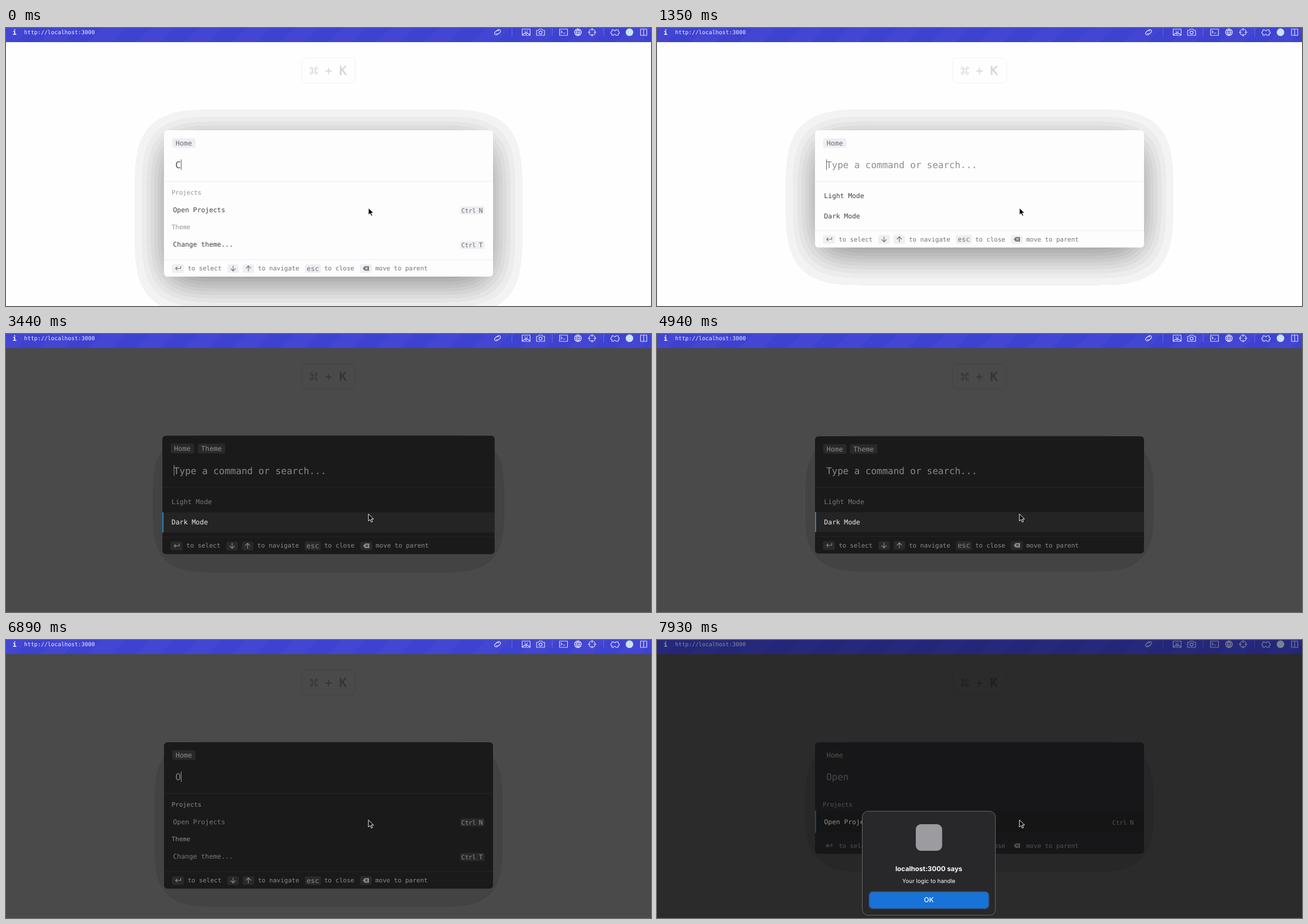
An HTML page that plays this animation: 1139 by 492 pixels, repeating every 8 s.

```html
<!DOCTYPE html>
<html lang="en">
<head>
<meta charset="utf-8">
<title>Command menu</title>
<style>
html, body { margin: 0; height: 100%; overflow: hidden; background: #fefefe; }
svg { display: block; width: 100vw; height: 100vh; }
text { font-family: "DejaVu Sans Mono", "Liberation Mono", monospace; text-rendering: geometricPrecision; white-space: pre; }
.ui { font-family: Inter, Roboto, sans-serif; text-anchor: middle; fill: #fff; }
.icon { fill: none; stroke-width: 1.2; stroke-linecap: round; stroke-linejoin: round; }
</style>
</head>
<body>
<svg id="stage" viewBox="0 0 1139 492" xmlns="http://www.w3.org/2000/svg"></svg>
<script>
const LOOP = 8000;
const stage = document.getElementById('stage');

const light = {
  page: '#fefefe', panel: '#fdfdfd', line: '#efeff0', tag: '#eeeff2', tagText: '#6b6b73',
  input: '#505054', hint: '#8e8e8e', caret: '#555', head: '#949494', row: '#404045',
  active: '#404045', foot: '#74747a', keyLine: '#f0f1f3', key: '#d2d5da', activeRow: 'none', bar: 'none',
  steps: Array.from({ length: 16 }, (_, k) => k ? k * .0312 + .012 : 0)
};
const dark = {
  page: '#4a4a4a', panel: '#1a1a1a', line: '#252525', tag: '#292929', tagText: '#8c8c8c',
  input: '#7c7c7c', hint: '#878787', caret: '#999', head: '#8c8c8c', row: '#777',
  active: '#eee', foot: '#8a8a8a', keyLine: '#434343', key: '#343434', activeRow: '#242424', bar: '#2c86b8',
  steps: Array.from({ length: 16 }, (_, k) => k < 5 ? 0 : .1)
};

const project = { group: 'Projects', label: 'Open Projects', key: 'N' };
const change = { group: 'Theme', label: 'Change theme...', key: 'T' };
const home = [project, change];
const modes = [{ label: 'Light Mode' }, { label: 'Dark Mode' }];

// Each entry changes part of the state from its time onward.
const timeline = [
  [0, { theme: light, items: home, query: 'C', caret: true, crumbs: ['Home'], active: -1, zoom: 1, alert: false }],
  [150, { query: 'Ch', items: [change] }],
  [300, { query: 'Cha' }],
  [450, { query: 'Chan' }],
  [600, { query: 'Chang' }],
  [900, { query: 'Change' }],
  [1050, { query: '', items: modes, zoom: 1.007 }],
  [1200, { zoom: 1.003 }],
  [1350, { zoom: 1 }],
  [1940, { caret: false, crumbs: ['Home', 'Theme'] }],
  [2090, { active: 1 }],
  [2390, { caret: true, active: 0 }],
  [2840, { caret: false }],
  [3140, { active: 1 }],
  [3440, { theme: dark, caret: true, zoom: 1.01 }],
  [3590, { zoom: 1 }],
  [3890, { caret: false }],
  [4340, { caret: true }],
  [4940, { caret: false }],
  [5390, { caret: true }],
  [5690, { items: home, crumbs: ['Home'], active: -1 }],
  [5840, { active: 0 }],
  [6440, { caret: false }],
  [6890, { query: 'O', caret: true, active: -1 }],
  [7040, { query: 'Op', items: [project] }],
  [7180, { query: 'Ope' }],
  [7480, { query: 'Open', active: 0 }],
  [7630, { caret: false }],
  [7930, { alert: true }]
];

const text = (x, y, size, fill, str, more = '') =>
  `<text x="${x}" y="${y}" font-size="${size}" fill="${fill}" ${more}>${str}</text>`;
const rect = (x, y, w, h, fill, r = 0, more = '') =>
  `<rect x="${x}" y="${y}" width="${w}" height="${h}" rx="${r}" fill="${fill}" ${more}/>`;
const icon = (d, stroke, more = '') => `<path class="icon" d="${d}" stroke="${stroke}" ${more}/>`;
const circle = (x, y, r) => `M${x - r} ${y}a${r} ${r} 0 1 0 ${2 * r} 0a${r} ${r} 0 1 0 ${-2 * r} 0`;

function toolbar() {
  const box = (x, y, w, h) => `M${x} ${y}h${w}v${h}h${-w}z`;
  const icons = [
    'M867 5l2-2a3 3 0 0 1 4 4l-3 3a3 3 0 0 1-4 0M869 10l-2 2a3 3 0 0 1-4-4l3-3a3 3 0 0 1 4 0',
    box(911.5, 2, 14, 11) + 'M912 12l4-3 2.5 2 2.5-2 4 3M916 5h1M920 5h1M917 7l1.5 1.5L920 7',
    'M937 4h3l1.5-2h5l1.5 2h3v9h-14z' + circle(944, 8, 2.7),
    box(977.5, 2, 14, 11) + 'M980 5l2 2-2 2M984 9h3',
    circle(1010, 7.5, 6) + 'M1004 7.5h12M1010 1.5q-5 6 0 12q5-6 0-12M1005 4.5h10M1005 10.5h10',
    circle(1035, 7.5, 5.5) + 'M1035 .5v4M1035 10.5v4M1028 7.5h4M1038 7.5h4',
    'M1070 3h3a2 2 0 0 0 4 0h4v3a2 2 0 0 1 0 4v3h-4a2 2 0 0 0-4 0h-3v-3a2 2 0 0 1 0-4z',
    box(1120.5, 2, 11, 11) + 'M1126 2v11'
  ];
  return `<defs><pattern id="stripes" width="60" height="60" patternUnits="userSpaceOnUse" patternTransform="rotate(45)">
      <rect width="30" height="60" fill="#4549d6"/></pattern></defs>`
    + rect(0, 0, 1139, 25, '#3e42d0') + rect(0, 0, 1139, 25, 'url(#stripes)', 0, 'opacity=".55"')
    + text(11.5, 12, 12, '#fff', 'i', 'font-weight="bold"')
    + text(32, 11, 9.9, '#eef', 'http://localhost:3000')
    + [893, 964, 1055].map(x => rect(x, 0, 1, 15, '#6468de')).join('')
    + icon(icons.join(''), '#dcdcfa')
    + '<circle cx="1101" cy="7.5" r="6.7" fill="#c9e2f2"/>';
}

function shortcutKey(c) {
  const command = 'M541 73v5h5v-5zM541 73h-1.7a1.9 1.9 0 1 1 1.7-1.9zM546 73v-1.9a1.9 1.9 0 1 1 1.7 1.9z'
    + 'M541 78v1.9a1.9 1.9 0 1 1-1.7-1.9zM546 78h1.7a1.9 1.9 0 1 1-1.7 1.9z';
  return rect(522, 53, 95, 44.5, 'none', 9, `stroke="${c.keyLine}"`)
    + icon(command, c.key)
    + text(563, 83, 21.6, c.key, '+') + text(588.5, 83, 21.6, c.key, 'K', 'stroke="' + c.key + '" stroke-width=".6"');
}

function footer(c, bottom) {
  const tag = (x, w) => rect(x, -22, w, 15.5, c.tag, 3);
  const label = (x, str) => text(x, -11, 11, c.foot, str);
  return `<g transform="translate(0 ${bottom})">` + rect(279, -30.5, 581, 1, c.line)
    + tag(293, 21) + tag(391, 20) + tag(418, 20) + tag(528, 28) + tag(625, 21)
    + icon('M308.500 -18v3.500h-9M302 -17l-2.500 2.500 2.500 2.500M401 -19v9M397 -14l4 4 4-4M428 -10v-9M424 -15l4-4 4 4', c.foot)
    + `<path d="M630 -14.500l3.500-4h7.500v8h-7.500z" fill="${c.foot}"/>`
    + icon('M635 -16l3 3M638 -16l-3 3', c.tag)
    + label(321, 'to select') + label(445, 'to navigate') + text(531, -10.5, 12, c.foot, 'esc')
    + label(562, 'to close') + label(652, 'move to parent') + '</g>';
}

function list(s, c) {
  let out = '';
  s.items.forEach((item, i) => {
    const on = i === s.active;
    const y = item.group ? 321.5 + i * 61.3 : 297 + i * 35.7;
    const top = item.group ? y - 19.5 : y - 17.5;
    const height = item.group ? 39 : 35.5;
    if (on) out += rect(279, top, 581, height, c.activeRow) + rect(279, top, 2, height, c.bar);
    if (item.group) out += text(292.5, y - 26.5, 10.95, c.head, item.group);
    const x = on && c === light ? 293 : 295;
    out += text(x, y + 4, 11.75, on ? c.active : c.row, item.label);
    if (item.key) {
      out += rect(802, y - 6, 43, 14.500, on ? c.activeRow : c.tag, 3)
        + text(804, y + 5, 10.7, c.tagText, 'Ctrl') + text(835, y + 5, 11.5, c.tagText, item.key);
    }
  });
  return out;
}

function palette(s, c) {
  const bottom = s.items === home ? 440 : s.items === modes ? 388.5 : 378.5;
  const height = bottom - 181;
  const caretX = 299 + s.query.length * 9.873;
  const crumbs = s.crumbs.map((name, i) =>
    rect(293.5 + i * 47.3, 195, name.length * 7.25 + 12, 17, c.tag, 3)
    + text(299.5 + i * 47.3, 208, 12, c.tagText, name)).join('');
  const tint = c === light && s.crumbs.length > 1 ? rect(279, 272, 581, bottom - 303, '#fafbfd') : '';
  return `<defs><filter id="shade" filterUnits="userSpaceOnUse" x="100" y="0" width="940" height="660" color-interpolation-filters="sRGB">
      <feGaussianBlur stdDeviation="35"/>
      <feComponentTransfer><feFuncA type="discrete" tableValues="${c.steps.join(' ')}"/></feComponentTransfer></filter></defs>
    <g transform="translate(569.5 284.5) scale(${s.zoom}) translate(-569.5 -284.5)">`
    + rect(279, 196, 581, height, '#000', 6, 'filter="url(#shade)"')
    + rect(279, 181, 581, height, s.alert ? '#28282b' : c.panel, 6)
    + tint + crumbs
    + text(299, 248, 16.4, s.query ? c.input : c.hint, s.query || 'Type a command or search...')
    + (s.caret ? rect(caretX, 232.5, 1, 18.5, c.caret) : '')
    + rect(279, 271, 581, 1, c.line)
    + list(s, c) + footer(c, bottom) + '</g>';
}

function dialog() {
  return rect(0, 0, 1139, 492, '#000', 0, 'opacity=".42"')
    + rect(362.5, 303, 235, 184, '#28282b', 10, 'stroke="#69696c"')
    + rect(457, 326, 46.5, 47, '#9c9ca0', 9)
    + text(480, 408.5, 11.8, '#fff', 'localhost:3000 says', 'class="ui" font-weight="bold"')
    + text(480, 430, 10, '#fff', 'Your logic to handle', 'class="ui"')
    + rect(375, 446, 210.5, 29, '#1873d8', 6, 'stroke="#2c5f96" stroke-width="2"')
    + text(480, 464, 12, '#fff', 'OK', 'class="ui" font-weight="500"');
}

function draw(s) {
  const c = s.theme;
  const pointer = '<path d="M640 318.500v12.500l3-2.700 2.200 4.700 2-1-2.100-4.500h4z" fill="#000" stroke="#fff" stroke-width="1"/>';
  stage.innerHTML = rect(0, 0, 1139, 492, c.page) + toolbar() + shortcutKey(c) + palette(s, c)
    + (s.alert ? dialog() : '') + pointer;
}

let shown = -1;
function tick(now) {
  const time = now % LOOP;
  const step = timeline.filter(([start]) => start <= time).length;
  if (step !== shown) {
    shown = step;
    draw(Object.assign({}, ...timeline.slice(0, step).map(([, part]) => part)));
  }
  requestAnimationFrame(now => tick(now - begin));
}
const begin = performance.now();
tick(0);
</script>
</body>
</html>
```
